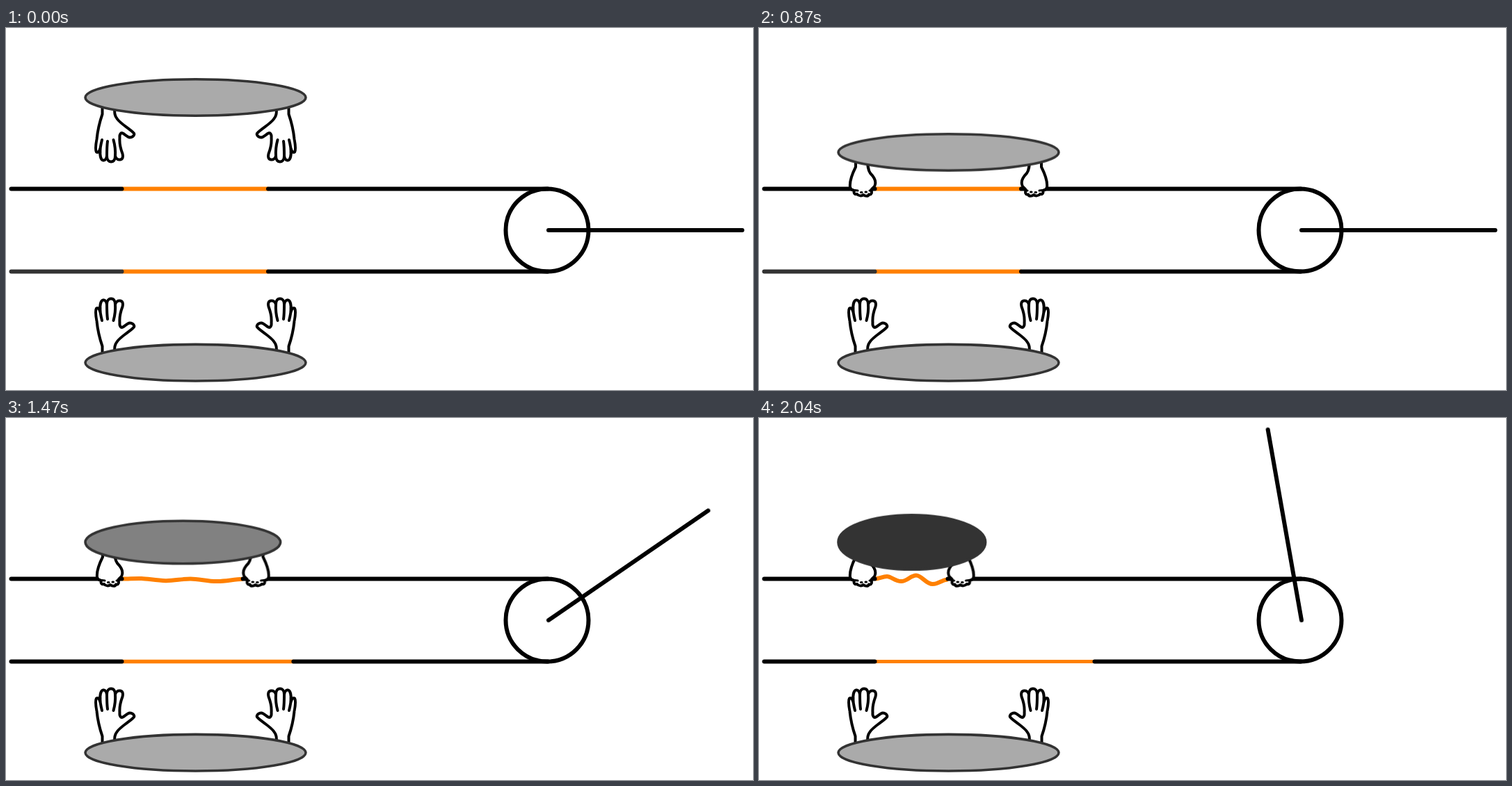
Recreate the animation shown at these times as an HTML page. Size 1074 by 521 pixels, loop 2.7 s.

```html
<!DOCTYPE html>
<html lang="en">
<head>
<meta charset="utf-8">
<title>Pulley and lever</title>
<style>
  html, body { margin: 0; width: 100%; height: 100%; overflow: hidden; background: #fff; }
  svg { display: block; width: 100%; height: 100%; }

  .rope, .band { fill: none; stroke: #000; stroke-width: 6; stroke-linecap: round; }
  .band { stroke: #ff8000; stroke-linecap: butt; }
  .skin { fill: #fff; stroke: #000; stroke-width: 4; stroke-linecap: round; stroke-linejoin: round; }
  .crease { fill: none; }
  .body { fill: #aaa; stroke: #333; stroke-width: 3.6; }

  /* One 2.7 s loop: reach 0.3-0.6 s, grip at 0.87 s, pull 1.17-2.07 s */
  .reach, .open, .closed, .pull, .contract, .lever, .slack, .stretch,
  .upper, .lower, .tail { animation: 2.7s infinite steps(30, jump-none); }

  .reach { animation-name: reach; animation-timing-function: steps(10, jump-start); }
  @keyframes reach {
    0%, 11.111% { transform: translateY(0); }
    22.222%, 100% { transform: translateY(78.8px); }
  }

  .open { animation-name: open; animation-timing-function: step-end; }
  .closed { animation-name: closed; animation-timing-function: step-end; }
  @keyframes open { 0% { visibility: visible; } 32.222%, 100% { visibility: hidden; } }
  @keyframes closed { 0% { visibility: hidden; } 32.222%, 100% { visibility: visible; } }

  .pull { animation-name: pull; }
  @keyframes pull {
    0%, 43.333% { transform: translateX(0); }
    76.666%, 100% { transform: translateX(-105.5px); }
  }

  .contract { animation-name: contract; }
  @keyframes contract {
    0%, 43.333% { cx: 272.5px; rx: 158.5px; ry: 26.3px; fill: #aaa; }
    76.666%, 100% { cx: 219.8px; rx: 105.8px; ry: 39.3px; fill: #333; }
  }

  .lever { transform-origin: 780px 291px; animation-name: lever; }
  @keyframes lever {
    0%, 43.333% { transform: rotate(0deg); }
    76.666%, 100% { transform: rotate(-100deg); }
  }

  .slack { animation-name: slack; }
  @keyframes slack {
    0%, 43.332% { d: path("M167 231.5H377"); }
    43.333% { d: path("M167 231.5C178 231.8 190 232 200.6 232.5S228 233.4 242.6 233.7S271 234 285.7 234S318 233.6 332.9 233S362 232 377 231.5"); }
    76.666%, 100% { d: path("M167 231.5C173 231 178 228 184 228S196 235 204.5 235S218 226.5 226 226.5S240 239 249.5 239S262 233 271.5 232.5"); }
  }

  .stretch { animation-name: stretch; }
  @keyframes stretch {
    0%, 43.333% { d: path("M167 350.5H377"); stroke-width: 6px; }
    76.666%, 100% { d: path("M167 350.5H482.5"); stroke-width: 5px; }
  }

  .upper { animation-name: upper; }
  @keyframes upper {
    0%, 43.333% { d: path("M377 231.5H779"); }
    76.666%, 100% { d: path("M271.5 231.5H779"); }
  }

  .lower { animation-name: lower; }
  @keyframes lower {
    0%, 43.333% { d: path("M377 350.5H779"); }
    76.666%, 100% { d: path("M482.5 350.5H779"); }
  }

  .tail { animation-name: tail; animation-timing-function: step-end; }
  @keyframes tail { 0% { stroke: #333; } 43.333%, 100% { stroke: #000; } }
</style>
</head>
<body>
<svg viewBox="0 0 1074 521">
  <defs>
    <g id="palm" class="skin">
      <path d="M138.5 110V124C133 140 131.500 150 130.500 160C129 168 128 175 130 178.500C132.500 180 134.500 177 135.200 174
        C135 183 135.500 189 139.500 190.500C143 191 144.500 187 145 184C145 190 148 192.500 151 192.500
        C155 192.500 157 189 157 184C158 188 161 190 164 189.500C168 189 168.500 185 167.500 181
        C164 172 163 165 163.500 158C163 153 165 150 168 151.500C172 154 175 157 178 157.500
        C183 157.500 186 153 183 150.500C176 144 164 137 160 131C156 126 156 124 156 110"/>
      <path class="crease" d="M138 161C136.500 167 135 174 135.200 180M146 163C145 170 145 178 145 185M154.500 161C157 170 157.500 178 157 185"/>
    </g>
    <g id="fist" class="skin">
      <path d="M139 186V200C134 210 130 221 131 229C131.500 233 134.500 233 137 234C135.500 238 138 240 141 239
        C143 242 148 242 150 240C153 242.500 157 242.500 158 239.500C162 240.500 162.500 237 161.500 233
        C163 230 167 229 167 225C168.500 219 164 213 160 209C157 205 156 200 156 186"/>
      <path class="crease" stroke-width="3" d="M138 233.500L142 234M146.500 236.500H148M153 236H154.500M159 234H161"/>
    </g>
    <g id="palms">
      <use href="#palm"/>
      <use href="#palm" transform="matrix(-1 0 0 1 545 0)"/>
    </g>
  </defs>

  <path class="band slack" d="M167 231.5H377"/>
  <path class="band stretch" d="M167 350.5H377"/>
  <path class="rope" d="M7.500 231.500H166.500"/>
  <path class="rope tail" d="M7.500 350.500H166.500"/>
  <path class="rope upper" d="M377 231.5H779"/>
  <path class="rope lower" d="M377 350.5H779"/>
  <circle class="rope" cx="778" cy="291" r="59.500"/>

  <g class="reach">
    <g class="open"><use href="#palms"/></g>
    <g class="closed" transform="translate(0 -78.8)">
      <use href="#fist"/>
      <g class="pull"><use href="#fist" transform="matrix(-1 0 0 1 545 0)"/></g>
    </g>
    <ellipse class="body contract" cx="272.5" cy="100" rx="158.5" ry="26.3"/>
  </g>

  <g transform="matrix(1 0 0 -1 0 582)">
    <use href="#palms"/>
    <ellipse class="body" cx="272.5" cy="100.3" rx="158.5" ry="26.3"/>
  </g>

  <path class="rope lever" d="M780 291H1058.500"/>
</svg>
</body>
</html>
```
